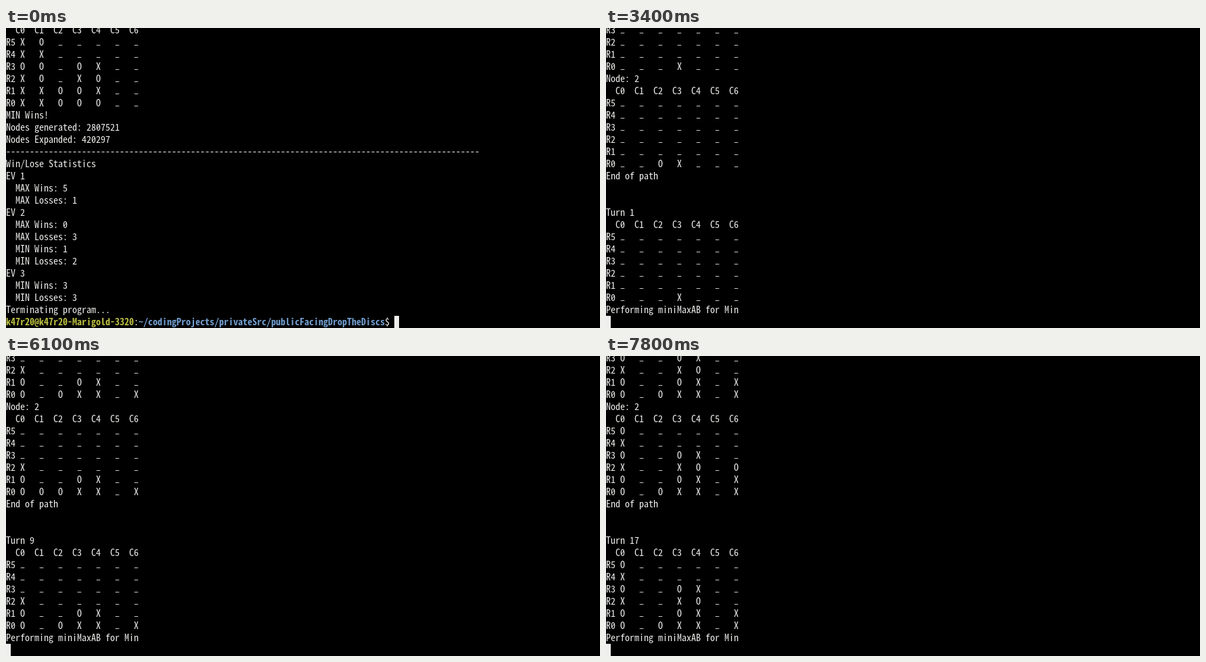
An HTML page with a canvas for the animation above (8000 ms loop, 878 by 444 pixels).

```html
<!DOCTYPE html>
<html lang="en">
<head>
<meta charset="utf-8">
<title>Terminal board game</title>
<style>
html, body { margin: 0; width: 100%; height: 100%; overflow: hidden; background: #000; }
canvas { display: block; }
</style>
</head>
<body>
<canvas id="screen" width="878" height="444"></canvas>
<script>
const ctx = document.getElementById("screen").getContext("2d");
const LOOP = 8000, CELL = 7, LINE = 18, TOP = -6, BASELINE = 14, ROWS = 24;
const WHITE = "#eeeeec", GREEN = "#b9bd40", BLUE = "#729fcf";
const FAMILY = '"Noto Sans Mono CJK JP", "Noto Sans Mono", monospace';
const LIFT = { "_": 2, "-": 1 };

// Font size at which one character is exactly one cell wide.
ctx.font = `100px ${FAMILY}`;
const fontSize = CELL * 100 / ctx.measureText("0").width;

// A board is seven columns, each a string of pieces from the bottom up.
const COLUMNS = [0, 1, 2, 3, 4, 5, 6];
const play = moves => COLUMNS.map(column =>
  [...moves].map((move, i) => +move === column ? "XO"[i % 2] : "").join(""));

function boardLines(board) {
  const lines = ["  " + COLUMNS.map(c => "C" + c).join("  ")];
  for (let row = 5; row >= 0; row--)
    lines.push(`R${row} ` + COLUMNS.map(c => (board[c] || "")[row] || "_").join("   "));
  return lines;
}

function turnLines(moves, prediction) {
  const current = boardLines(play(moves));
  return [
    ...current, "Node: 2", ...boardLines(play(moves + prediction)),
    "End of path", "", "", "Turn " + moves.length, ...current,
    "Performing miniMaxAB for Min"
  ];
}

const summary = [
  ...boardLines(["XXXOXX", "XXOOXO", "OO", "OOXO", "OXOX"]),
  "MIN Wins!", "Nodes generated: 2807521", "Nodes Expanded: 420297",
  "-".repeat(100), "Win/Lose Statistics",
  "EV 1", "  MAX Wins: 5", "  MAX Losses: 1",
  "EV 2", "  MAX Wins: 0", "  MAX Losses: 3", "  MIN Wins: 1", "  MIN Losses: 2",
  "EV 3", "  MIN Wins: 3", "  MIN Losses: 3",
  "Terminating program..."
];

const prompt = command => [
  ["k47r20@k47r20-Marigold-3320", GREEN, "bold"],
  [":", WHITE],
  ["~/codingProjects/privateSrc/publicFacingDropTheDiscs", BLUE, "bold"],
  ["$ " + command, WHITE]
];

const GAME = "32436040003403406";
const turn = (start, count, prediction) =>
  ({ start, lines: turnLines(GAME.slice(0, count), prediction).slice(-ROWS) });

const scenes = [
  { start: 0, lines: summary, input: prompt("") },
  { start: 700, lines: summary, input: prompt("./output -f ") },
  { start: 3300, lines: turnLines("1025314", "3").slice(0, ROWS) },
  turn(3400, 1, "2"),
  turn(4300, 3, "4"),
  turn(4900, 5, "4"),
  turn(5400, 7, "1"),
  turn(6100, 9, "1"),
  turn(6700, 11, "0"),
  turn(7500, 13, "5"),
  turn(7700, 15, "5"),
  turn(7800, 17, "6")
];

function slashZero(x, baseline) {
  ctx.beginPath();
  ctx.moveTo(x + 2, baseline - 3);
  ctx.lineTo(x + 5, baseline - 7.5);
  ctx.stroke();
}

// Draws text on the character grid and returns the next free column.
function write(text, row, column = 0, color = WHITE, weight = "normal") {
  const baseline = TOP + row * LINE + BASELINE;
  ctx.font = `${weight} ${fontSize}px ${FAMILY}`;
  ctx.fillStyle = ctx.strokeStyle = color;
  for (const char of text) {
    const x = column++ * CELL;
    ctx.fillText(char, x, baseline - (LIFT[char] || 0));
    if (char === "0") slashZero(x, baseline);
  }
  return column;
}

function draw(time) {
  const { lines, input = [] } = scenes.findLast(scene => scene.start <= time);
  ctx.fillStyle = "#000";
  ctx.fillRect(0, 0, 878, 444);
  lines.forEach((line, row) => write(line, row));
  let column = 0;
  for (const [text, color, weight] of input) column = write(text, ROWS, column, color, weight);
  ctx.fillStyle = WHITE;
  ctx.fillRect(column * CELL, TOP + ROWS * LINE, CELL, LINE);
}

const began = performance.now();
function tick() {
  draw((performance.now() - began) % LOOP);
  requestAnimationFrame(tick);
}
tick();
</script>
</body>
</html>
```
